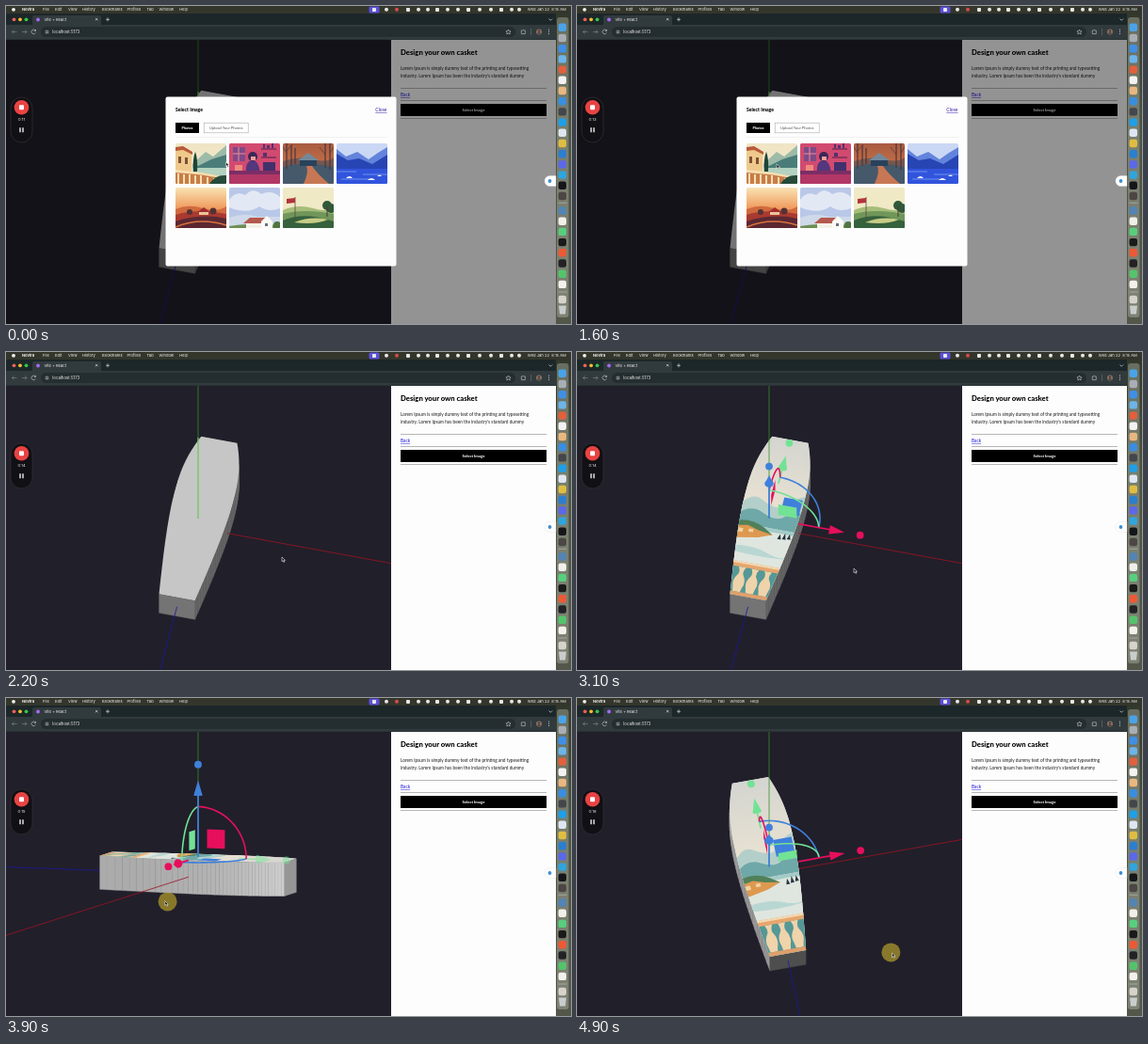
These frames come from a looping animation (600 by 338 pixels, 5000 ms). An HTML page:

```html
<!DOCTYPE html>
<html lang="en">
<head>
<meta charset="utf-8">
<title>Casket designer</title>
<style>
  html, body { margin: 0; width: 100%; height: 100%; overflow: hidden; background: #211f2a; }
  svg { display: block; width: 100vw; height: 100vh; }
  .ui { font-family: Inter, Roboto, sans-serif; font-size: 4.1px; fill: #f2f2f2; }
  .page { font-family: Lato, "Open Sans", sans-serif; font-size: 4.75px; fill: #1c1c1c; }
  .bold { font-weight: 700; }
  .page .bold { font-weight: 800; fill: #000; }
  .mid { text-anchor: middle; }
  .link { fill: #1a12d8; text-decoration: underline; }
</style>
</head>
<body>
<svg viewBox="0 0 600 338">
  <defs>
    <clipPath id="view"><rect y="36" width="409" height="302"/></clipPath>
    <clipPath id="lid"><path id="lidPath"/></clipPath>
    <clipPath id="thumb"><rect width="54" height="43" rx="1.5"/></clipPath>
    <linearGradient id="wall" x2="0" y2="1">
      <stop offset="0" stop-color="#30372a"/><stop offset=".4" stop-color="#4c5443"/><stop offset="1" stop-color="#53574a"/>
    </linearGradient>
    <linearGradient id="warm" x2="0" y2="1"><stop offset="0" stop-color="#f8e3b4"/><stop offset=".6" stop-color="#ef8f4f"/></linearGradient>
    <linearGradient id="dusk" x2="0" y2="1"><stop offset="0" stop-color="#a85c42"/><stop offset="1" stop-color="#dd7f48"/></linearGradient>
    <linearGradient id="sky" x2="0" y2="1"><stop offset="0" stop-color="#d3d5d0"/><stop offset=".5" stop-color="#ece3d2"/></linearGradient>

    <g id="lake">
      <rect x="-34" y="-105" width="68" height="210" fill="url(#sky)"/>
      <path d="M-34-12Q-24-30-12-22T8-16Q20-32 34-36V30H-34Z" fill="#b4cfca"/>
      <path d="M-34 0Q-22-14-8-6T14-4Q24-14 34-14V18H-34Z" fill="#6fa8a8"/>
      <rect x="-34" y="12" width="68" height="55" fill="#dfe6df"/>
      <path d="M-34 12H34V17Q4 14-34 22Z" fill="#a5cbc8"/>
      <path d="M-34 10Q-18 3-2 13L8 20-8 25-34 30Z" fill="#51805a"/>
      <path d="M-34 16L-20 13-8 17 8 20-6 26-34 32Z" fill="#dd9950"/>
      <path d="M-30 18h6v5h-6zM-18 17h5v4h-5z" fill="#f1d2a2"/>
      <path d="M14 24l2-7 2 7zM19 23l2-8 2 8zM24 22l2-7 2 7z" fill="#23343e"/>
      <path d="M-34 42Q-10 36 8 44T34 40V47Q4 52-34 48Z" fill="#b9d7d2"/>
      <rect x="-34" y="62" width="68" height="43" fill="#559896"/>
      <path d="M-34 60H34V67H-34Z" fill="#e7a66c"/>
      <path d="M-34 60H34V62.5H-34Z" fill="#f2d9b4"/>
      <g id="posts" fill="#efd3ab"/>
      <path d="M-34 99H34V105H-34Z" fill="#dfa06c"/>
    </g>

    <g id="t0">
      <rect width="54" height="43" fill="#f0e6c6"/>
      <path d="M18 22L32 9 40 14 54 2V30H18Z" fill="#9dbba8"/>
      <path d="M22 25L38 17 54 12V31H22Z" fill="#4a7d79"/>
      <path d="M18 26H54V38H18Z" fill="#b3d2c0"/>
      <path d="M0 6L8 5 17 10V34H0Z" fill="#efc98c"/><path d="M0 4L8 3 18 9V12L8 7 0 8Z" fill="#b9593a"/>
      <path d="M3 14h3v7H3zM10 15h3v7h-3z" fill="#7d5038"/>
      <path d="M19 30Q18 16 21 9 24 17 23 30Z" fill="#1f4436"/>
      <path d="M0 29L28 32 54 37V43H0Z" fill="#c77c48"/><path d="M0 28L28 31 54 36V38L28 33.5 0 31Z" fill="#f7deb0"/>
      <path d="M3 32v11M9 33v10M15 33v10M21 34v9M27 34v9M34 36v7M41 37v6" stroke="#f7deb0" stroke-width="2"/>
      <path d="M36 43Q42 33 54 34V43Z" fill="#264b3a"/>
    </g>
    <g id="t1">
      <rect width="54" height="43" fill="#d24a70"/>
      <rect x="4" y="4" width="13" height="15" fill="#7e4a87"/><path d="M10 4v15M4 11h13" stroke="#ef8b98"/>
      <path d="M34 5h16v2H34zM34 14h16v2H34z" fill="#8f345f"/>
      <path d="M36 1h2v4h-2zM40 2h3v3h-3zM45 0h2v5h-2zM36 10h4v4h-4z" fill="#533270"/>
      <path d="M18 31Q17 19 24 18T33 31Z" fill="#54377d"/><circle cx="25" cy="14" r="5" fill="#3b2858"/>
      <path d="M23 14h5v4h-5z" fill="#f0a09a"/>
      <path d="M0 29H54V33H0Z" fill="#7c2e66"/><path d="M0 33H54V43H0Z" fill="#b23766"/>
      <path d="M36 20H49V29H36Z" fill="#41316c"/><path d="M6 23h8v6H6z" fill="#ee8a7f"/>
    </g>
    <g id="t2">
      <rect width="54" height="43" fill="url(#dusk)"/>
      <path d="M0 19Q16 13 32 17T54 15V43H0Z" fill="#75574f"/>
      <path d="M0 25Q22 18 54 25V43H0Z" fill="#46596a"/>
      <path d="M22 43Q28 30 25 24H31Q36 32 49 43Z" fill="#c77754"/>
      <path d="M18 17L27 11 36 17V24H18Z" fill="#29425b"/><path d="M16 18L27 10 38 18Z" fill="#73899a"/>
      <path d="M4 0v27M9 2v22M45 0v26M50 0v28M13 5v17" stroke="#4d3439" stroke-width="1.2"/>
      <path d="M4 10L0 4M4 8L10 1M45 12L39 4M50 10L54 4" stroke="#4d3439" stroke-width=".7"/>
    </g>
    <g id="t3">
      <rect width="54" height="43" fill="#cbd8f5"/>
      <path d="M0 6L10 14 22 9 34 17 44 10 54 4V32H0Z" fill="#6384dc"/>
      <path d="M0 11L12 18 24 16 38 22 54 12V31H0Z" fill="#2845b4"/>
      <rect y="27" width="54" height="16" fill="#3154dc"/>
      <path d="M0 30h21M28 33h26M5 38h29" stroke="#6d91ee"/>
      <path d="M10 37q4-4 7 0zM33 39q4-4 8 0zM43 35q3-3 5 0z" fill="#fff"/>
    </g>
    <g id="t4">
      <rect width="54" height="43" fill="url(#warm)"/>
      <path d="M0 23Q14 17 29 22T54 20V43H0Z" fill="#d06a3f"/>
      <path d="M0 29Q20 22 54 28V43H0Z" fill="#a83a30"/>
      <path d="M0 36Q28 27 54 33V43H0Z" fill="#5b2832"/>
      <path d="M0 42Q26 31 54 40" stroke="#d8733f" stroke-width="1.5" fill="none"/>
      <path d="M25 25l4-3 6 3v4H25z" fill="#e9c39a"/><path d="M23 26l7-5 7 5z" fill="#a22d2c"/>
      <circle cx="40" cy="25" r="3.5" fill="#543233"/><circle cx="15" cy="26" r="3" fill="#543233"/>
    </g>
    <g id="t5">
      <rect width="54" height="43" fill="#b9c8e8"/>
      <path d="M0 13Q7 3 17 8 25-1 34 7 45 2 54 10V22Q42 27 32 20 20 29 0 21Z" fill="#e3e9f4"/>
      <path d="M0 32Q16 26 30 31H54V43H0Z" fill="#cfd9e9"/>
      <path d="M0 41Q22 37 54 40V43H0Z" fill="#6e8e54"/>
      <path d="M18 37h28v6H18z" fill="#f4f1e8"/><path d="M15 38l7-6h17l4 6z" fill="#b5584d"/>
      <path d="M34 43V36l6-6 6 6v7z" fill="#fbfaf4"/><path d="M38 38h3v3h-3z" fill="#63738a"/>
      <circle cx="51" cy="40" r="4" fill="#50753f"/>
    </g>
    <g id="t6">
      <rect width="54" height="43" fill="#f0e9c6"/>
      <path d="M0 24Q16 17 32 22T54 20V43H0Z" fill="#a7bd7b"/>
      <path d="M0 28Q22 22 54 28V43H0Z" fill="#70965a"/>
      <path d="M0 35Q22 25 54 36V43H0Z" fill="#36613d"/>
      <path d="M12 37Q30 30 48 34 34 40 12 37Z" fill="#c7cd86"/>
      <path d="M13 10V35" stroke="#5a4a3a" stroke-width=".8"/><path d="M4 12L13 11V16L4 17Z" fill="#b3323b"/>
      <circle cx="47" cy="19" r="5" fill="#31583b"/><circle cx="51" cy="22" r="5" fill="#31583b"/>
      <path d="M47 20v11" stroke="#463c2e"/>
    </g>
  </defs>

  <rect width="600" height="338" fill="url(#wall)"/>
  <rect y="36" width="409" height="302" fill="#211f2a"/>
  <g clip-path="url(#view)">
    <g id="back"/>
    <g id="top"><g clip-path="url(#lid)">
      <rect x="-34" y="-105" width="68" height="210" fill="#c6c6c6"/>
      <use id="photo" href="#lake"/>
    </g></g>
    <g id="front"/>
  </g>

  <g class="page">
    <rect x="409" y="36" width="175" height="302" fill="#fdfdfd"/>
    <text x="419" y="52.4" class="bold" style="font-size:7.7px">Design your own casket</text>
    <text x="419" y="68">Lorem Ipsum is simply dummy text of the printing and typesetting</text>
    <text x="419" y="75.5">industry. Lorem Ipsum has been the industry's standard dummy</text>
    <path d="M419 87.5H574M419 100.5H574M419 119.5H574" stroke="#999" stroke-width=".7"/>
    <text x="419" y="96" class="link">Back</text>
    <rect x="419" y="104" width="155" height="13" fill="#000"/>
    <text x="496.5" y="112" class="bold mid" style="fill:#fff;font-size:4.2px">Select Image</text>
  </g>

  <g id="dialog" class="page">
    <rect y="36" width="584" height="302" fill="#000" opacity=".42"/>
    <rect x="169.5" y="96.5" width="245" height="180" rx="2" fill="#fdfdfd"/>
    <text x="180" y="112" class="bold" style="font-size:5.1px">Select Image</text>
    <text x="404.5" y="112" class="link" text-anchor="end" style="fill:#3a1aa5;font-size:5px">Close</text>
    <rect x="180" y="124" width="25" height="11" fill="#000"/>
    <text x="192.5" y="131" class="bold mid" style="fill:#fff;font-size:3.8px">Photos</text>
    <rect x="210.2" y="124.2" width="47" height="10.6" fill="#fff" stroke="#aaa" stroke-width=".6"/>
    <text x="233.7" y="131" class="mid" style="fill:#555;font-size:4.1px">Upload Your Photos</text>
    <path d="M180 139.5H405" stroke="#ececec" stroke-width=".7"/>
    <g id="thumbs"/>
  </g>

  <path d="M584 180.5H577.5A5.5 5.5 0 0 0 577.5 191.5H584Z" fill="#fff" stroke="#ddd" stroke-width=".4"/>
  <circle cx="577.5" cy="186" r="1.9" fill="#3d8fd0"/>

  <g class="ui">
    <rect width="600" height="8" fill="#34362b"/>
    <g id="menu"/>
    <text x="594.7" y="5.2" text-anchor="end">Wed Jan 22&#160; 8:15 AM</text>
    <rect y="8" width="584" height="28" fill="#1c2729"/>
    <rect y="20" width="584" height="15.6" fill="#313a3d"/>
    <path d="M28 20V12Q28 10 30 10H99Q101 10 101 12V20Z" fill="#313a3d"/>
    <circle cx="8.5" cy="14.3" r="1.9" fill="#f05f57"/><circle cx="15" cy="14.3" r="1.9" fill="#f5bd30"/><circle cx="21.5" cy="14.3" r="1.9" fill="#35c649"/>
    <circle cx="34" cy="14.5" r="2" fill="#a06bf0"/>
    <text x="40.5" y="16">Vite + React</text>
    <g fill="none" stroke="#d5d9da" stroke-width=".7">
      <path d="M95 13l2.4 2.4M97.4 13L95 15.4M106 14.3h4M108 12.3v4M576.5 13.5l1.8 1.8 1.8-1.8"/>
      <path d="M11.5 27.5h-5m2-2l-2 2 2 2M17 27.5h5m-2-2l2 2-2 2" opacity=".45"/>
      <path d="M31.3 26.2A2.3 2.3 0 1 0 31.4 28.4M31.5 24.8v1.7h-1.7" opacity=".8"/>
    </g>
    <rect x="37" y="22" width="504" height="11" rx="5.5" fill="#242d2f"/>
    <circle cx="43.5" cy="27.5" r="2.6" fill="#41474a"/><path d="M42 26.8h3M42 28.4h3" stroke="#ddd" stroke-width=".5"/>
    <text x="49.3" y="29.1" style="font-size:4.3px">localhost:5173</text>
    <g fill="none" stroke="#c9cdd0" stroke-width=".6">
      <path d="M533.5 25l.8 1.7 1.8.2-1.3 1.2.4 1.9-1.7-1-1.7 1 .4-1.9-1.3-1.2 1.8-.2z"/>
      <path d="M547.3 26h1.3q.7-1.6 1.4 0h1.3v3.6h-4z"/><path d="M557.5 24v7" opacity=".4"/>
    </g>
    <circle cx="566" cy="27.5" r="3" fill="#8a6f5e"/><path d="M564 29.6q2-3 4 0z" fill="#2c2f38"/><circle cx="566" cy="26.5" r="1" fill="#2c2f38"/>
    <path d="M576.5 25.2h.1m-.1 2.2h.1m-.1 2.2h.1" stroke="#ddd" stroke-width="1" stroke-linecap="round"/>
    <rect x="585" y="12" width="12.5" height="319" rx="3" fill="#c8cabd" opacity=".36"/>
    <g id="dock"/>
    <rect x="5" y="97" width="23" height="48" rx="11.5" fill="#111014" stroke="#34333a" stroke-width=".7"/>
    <circle cx="16.5" cy="107.8" r="7.8" fill="#e94343"/><rect x="14" y="105.3" width="5" height="5" rx="1" fill="#fff"/>
    <text id="clock" x="16.5" y="122.3" class="mid"/>
    <path d="M15 129.2v5M18 129.2v5" stroke="#fff" stroke-width="1.3"/>
  </g>

  <circle id="press" r="10" fill="#c8b02c" opacity=".62"/>
  <path id="cursor" d="M0 0V4.6L1.1 3.6 2 5.4 2.9 5 2 3.3H3.5Z" fill="#111" stroke="#fff" stroke-width=".55"/>
</svg>
<script>
const $ = id => document.getElementById(id);
const RED = '#e60f5c', GREEN = '#72e295', BLUE = '#3f80dc';
const END = 103.5, HALF = 19.5, HIGH = 18, STEPS = 40;
const LOOP = 5000, CLOSE_AT = 1700, PHOTO_AT = 2500, PRESS_AT = 3250;

// Keyframes: [ms, value]; the camera trails the mouse, as damped orbiting does
const keys = {
  turn: [[3200, 12.5], [3900, 108.5], [4250, 151], [4400, 142], [4900, -11], [5000, -20]],
  tilt: [[3200, 56], [3900, 6.2], [4200, 5], [4400, 9.4], [4900, 65], [5000, 67]],
  mouseX: [[300, 233.5], [1500, 212], [1650, 212], [2200, 293], [3100, 294], [3250, 292], [3850, 172], [4150, 160], [4400, 245], [4900, 334.5]],
  mouseY: [[300, 166], [1500, 168], [1650, 168], [2200, 218], [3100, 230], [3250, 244], [3850, 216.5], [4150, 214], [4400, 233], [4900, 271]],
  right: [[3200, 106], [3900, 180]],
  foot: [[3200, 116], [4900, 78]],
  head: [[3900, 150], [4400, 112]]
};

// Monotone cubic interpolation
function track(k, t) {
  const n = k.length - 1;
  if (t <= k[0][0]) return k[0][1];
  if (t >= k[n][0]) return k[n][1];
  const i = k.findIndex(p => p[0] > t) - 1;
  const slope = j => (k[j + 1][1] - k[j][1]) / (k[j + 1][0] - k[j][0]);
  const tangent = j => {
    if (j === 0 || j === n) return 0;
    const a = slope(j - 1), b = slope(j);
    return a * b <= 0 ? 0 : 2 * a * b / (a + b);
  };
  const h = k[i + 1][0] - k[i][0], s = (t - k[i][0]) / h, s2 = s * s, s3 = s2 * s;
  return (2 * s3 - 3 * s2 + 1) * k[i][1] + (s3 - 2 * s2 + s) * h * tangent(i)
    + (3 * s2 - 2 * s3) * k[i + 1][1] + (s3 - s2) * h * tangent(i + 1);
}

// Half outline of the lid as [x, z], head to foot
const bez = (a, b, c, d, s) => {
  const r = 1 - s;
  return r * r * r * a + 3 * r * r * s * b + 3 * r * s * s * c + s * s * s * d;
};
const edge = Array.from({ length: STEPS + 1 }, (_, i) =>
  [bez(HALF, 36, 36, HALF, i / STEPS), bez(-END, -60, -20, END, i / STEPS)]);

const path = (pts, close) => 'M' + pts.map(p => p[0].toFixed(2) + ' ' + p[1].toFixed(2)).join('L') + (close ? 'Z' : '');
const fill = (pts, c, extra = '') => `<path d="${path(pts, true)}" fill="${c}" ${extra}/>`;
const line = (pts, c, w) => `<path d="${path(pts)}" fill="none" stroke="${c}" stroke-width="${w}"/>`;
const grey = v => { const g = Math.round(Math.min(v, 205)); return `rgb(${g},${g},${g})`; };

function makeCamera(turn, tilt) {
  const rad = Math.PI / 180;
  const ca = Math.cos(turn * rad), sa = Math.sin(turn * rad);
  const ce = Math.cos(tilt * rad), se = Math.sin(tilt * rad);
  return {
    se,
    at: (x, y, z) => [204 + x * ca - z * sa, 187 + (x * sa + z * ca) * se - y * ce],
    facing: (x, y, z) => x * sa * ce + y * se + z * ca * ce,
    lid: `matrix(${ca} ${sa * se} ${-sa} ${ca * se} 204 ${187 - HIGH * ce})`
  };
}

function box(cam, t) {
  let out = '';
  const wall = (p, q, shade) => {
    const c = grey(shade);
    return fill([cam.at(p[0], HIGH, p[1]), cam.at(q[0], HIGH, q[1]), cam.at(q[0], -HIGH, q[1]), cam.at(p[0], -HIGH, p[1])],
      c, `stroke="${c}" stroke-width=".4"`);
  };
  for (const side of [1, -1]) {
    const shade = side > 0 ? track(keys.right, t) : 158;
    for (let i = 0; i < STEPS; i++) {
      const [x0, z0] = edge[i], [x1, z1] = edge[i + 1];
      const len = Math.hypot(x1 - x0, z1 - z0), nx = side * (z1 - z0) / len, nz = (x0 - x1) / len;
      if (cam.facing(nx, 0, nz) > 0) out += wall([side * x0, z0], [side * x1, z1], shade * (1 - .4 * nz));
    }
  }
  for (const end of [1, -1]) {
    if (cam.facing(0, 0, end) > 0)
      out += wall([-HALF, end * END], [HALF, end * END], track(end > 0 ? keys.foot : keys.head, t));
  }
  return out;
}

// Transform handles: sideways, up and towards the head
function handles(cam) {
  const X = [1, 0, 0], U = [0, 1, 0], H = [0, 0, -1];
  const mix = (a, p, b, q) => cam.at(a[0] * p + b[0] * q, HIGH + a[1] * p + b[1] * q, a[2] * p + b[2] * q);
  const on = (a, p) => mix(a, p, a, 0);
  const plane = (a, b, c) => fill([mix(a, 10, b, 10), mix(a, 30, b, 10), mix(a, 30, b, 30), mix(a, 10, b, 30)], c);
  const arc = (a, b, c) => line(Array.from({ length: 25 }, (_, i) => {
    const r = i / 24 * Math.PI / 2;
    return mix(a, 54 * Math.cos(r), b, 54 * Math.sin(r));
  }), c, 1.6);
  const arrow = (a, c, from) => {
    const base = on(a, 66), tip = on(a, 82), ball = on(a, 99);
    const dx = tip[0] - base[0], dy = tip[1] - base[1], len = Math.hypot(dx, dy) || 1;
    const nx = -dy / len * 4.7, ny = dx / len * 4.7;
    const flat = 4.7 * Math.abs(cam.facing(...a)), angle = Math.atan2(dy, dx) * 180 / Math.PI;
    return line([on(a, from), base], c, 1.7)
      + fill([[base[0] + nx, base[1] + ny], tip, [base[0] - nx, base[1] - ny]], c)
      + `<ellipse rx="${flat}" ry="4.7" fill="${c}" transform="translate(${base}) rotate(${angle})"/>`
      + `<circle cx="${ball[0]}" cy="${ball[1]}" r="3.9" fill="${c}"/>`;
  };
  return `<g opacity="${Math.min(1, .15 + cam.se * 3.2)}">${arrow(H, GREEN, 46)}</g>`
    + arc(X, H, BLUE) + plane(X, H, BLUE) + arc(H, U, RED) + plane(H, U, RED)
    + arc(X, U, GREEN) + plane(X, U, GREEN) + arrow(X, RED, 32) + arrow(U, BLUE, 0);
}

function drawScene(t) {
  const cam = makeCamera(track(keys.turn, t), track(keys.tilt, t));
  const chosen = t >= PHOTO_AT;
  let under = '', over = '';
  const axis = (a, from, c) => {
    const s = line([cam.at(...a.map(v => v * from)), cam.at(...a.map(v => v * 700))], c, .8);
    if (cam.facing(...a) > 0) over += s; else under += s;
  };
  axis([1, 0, 0], 31.9, '#9c1423');
  axis([0, 0, 1], END, '#1a189c');
  axis([0, 1, 0], HIGH, '#35902a');
  if (!chosen) over += line([cam.at(0, HIGH, 0), [204, 91]], '#8fe37c', .9);
  $('back').innerHTML = under + box(cam, t);
  $('top').setAttribute('transform', cam.lid);
  $('photo').style.display = chosen ? '' : 'none';
  $('front').innerHTML = over + (chosen ? handles(cam) : '');
}

function draw(t) {
  drawScene(t);
  $('dialog').style.display = t < CLOSE_AT ? '' : 'none';
  $('clock').textContent = '0:' + Math.floor(11.85 + t / 1000);
  const move = (id, at) =>
    $(id).setAttribute('transform', `translate(${track(keys.mouseX, at)} ${track(keys.mouseY, at)})`);
  move('cursor', t);
  move('press', t - 45);
  $('press').style.display = t >= PRESS_AT ? '' : 'none';
}

function build() {
  $('lidPath').setAttribute('d', path([...edge, ...edge.map(([x, z]) => [-x, z]).reverse()], true));
  for (let x = -28; x <= 28; x += 14)
    $('posts').innerHTML += `<path d="M${x - 4} 67h8q-3 6-1 10 5 8 2 16l-1 6h-8l-1-6q-3-8 2-16 2-4-1-10z"/>`;
  for (let i = 0; i < 7; i++)
    $('thumbs').innerHTML += `<g transform="translate(${180 + i % 4 * 57} ${i < 4 ? 146 : 193})" clip-path="url(#thumb)"><use href="#t${i}"/></g>`;

  const items = [['Novira', 17], ['File', 39], ['Edit', 52], ['View', 66], ['History', 81], ['Bookmarks', 102],
    ['Profiles', 128.5], ['Tab', 149.5], ['Window', 162.5], ['Help', 184]];
  let bar = '<circle cx="8" cy="3.8" r="1.9" fill="#f2f2f2"/><rect x="385.5" y=".4" width="11" height="7" rx="1.5" fill="#5b50d8"/>';
  items.forEach(([s, x], i) => bar += `<text x="${x}" y="5.2" class="${i ? '' : 'bold'}">${s}</text>`);
  [391, 404, 415, 427, 438, 448, 458, 469, 480, 491, 503, 515, 526, 537, 545].forEach((x, i) =>
    bar += i % 3 ? `<circle cx="${x}" cy="3.8" r="2" fill="${i === 2 ? '#d94a4a' : '#e8e8e8'}"/>`
      : `<rect x="${x - 2}" y="1.9" width="4" height="4" rx=".8" fill="#e8e8e8"/>`);
  $('menu').innerHTML = bar;

  const apps = ('#4aa3e8 #a9adb5 #3f8fe6 #6db4e8 #e2603c #f3f3f3 #e9b780 #3a8ee0 #44464c #1f9fe8 #dfe6f2 #e0bd42 ' +
    '#2b7fd0 #5b68ea #30a5dd #15161a #4c4644').split(' ');
  const tools = '#5384b4 #f1efe9 #57cf7d #1a1a1a #ec5a35 #222226 #54c46b #f4f1ec'.split(' ');
  const icon = (c, y) => `<rect x="586.6" y="${y - 4.2}" width="8.4" height="8.4" rx="2.2" fill="${c}"/>`;
  $('dock').innerHTML = apps.map((c, i) => icon(c, 22.8 + i * 11.2)).join('')
    + tools.map((c, i) => icon(c, 217.5 + i * 11.2)).join('')
    + '<path d="M586.5 209.3h9M586.5 304h9" stroke="#ddd" stroke-width=".4"/>'
    + icon('#d6d3cc', 312) + '<path d="M587 318.5h8l-1 9h-6z" fill="#c9cdcc"/>';
}

build();
const start = performance.now();
function tick() {
  draw((performance.now() - start) % LOOP);
  requestAnimationFrame(tick);
}
tick();
</script>
</body>
</html>
```
